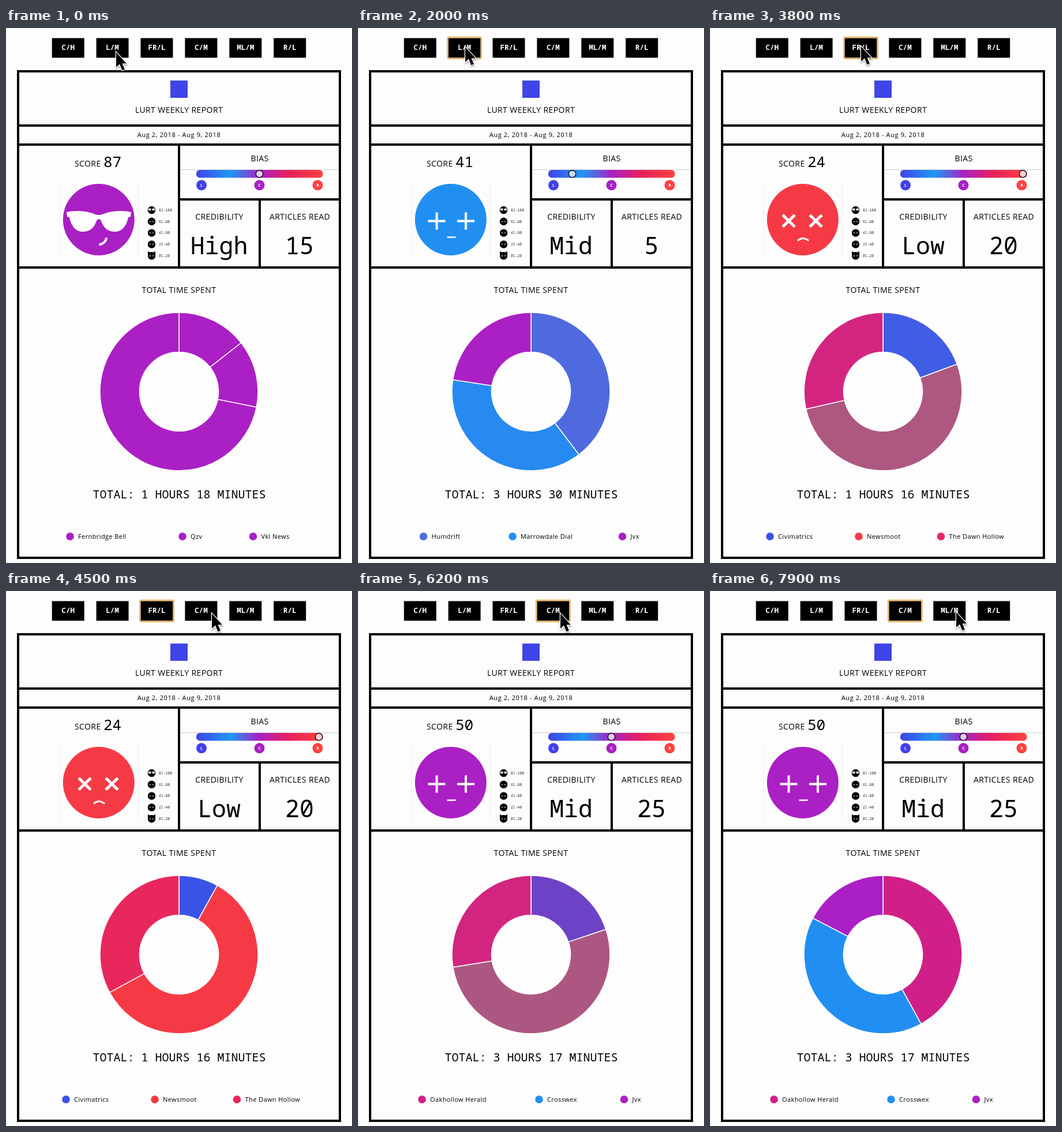
Animation of 600 by 927 pixels, one loop 8 s. Source, as an HTML page:

```html
<!DOCTYPE html>
<html lang="en">
<head>
<meta charset="utf-8">
<title>Weekly report</title>
<style>
html, body { margin: 0; width: 100%; height: 100%; overflow: hidden; background: #fefdfe; }
svg { display: block; width: 600px; height: 927px; }
text { font: 14px "Open Sans", "Noto Sans", sans-serif; letter-spacing: .4px; }
.mid { text-anchor: middle; }
.small { font-size: 11px; letter-spacing: .65px; }
.key { font-size: 11px; letter-spacing: .4px; }
.mono { font-family: "Noto Sans Mono", "DejaVu Sans Mono", monospace; letter-spacing: 0; }
.button { font-size: 12.6px; font-weight: 700; fill: #fff; }
.range { font-size: 6.4px; fill: #333; }
.side { font-size: 7px; font-weight: 700; fill: #fff; letter-spacing: 0; }
</style>
</head>
<body>
<svg viewBox="0 0 600 927">
  <defs>
    <linearGradient id="bias">
      <stop offset="0" stop-color="#3f42e8"/>
      <stop offset=".27" stop-color="#1f98f4"/>
      <stop offset=".5" stop-color="#a820c4"/>
      <stop offset=".73" stop-color="#e8215c"/>
      <stop offset="1" stop-color="#ff4240"/>
    </linearGradient>
    <filter id="shadow" x="-50%" y="-50%" width="200%" height="200%">
      <feDropShadow dx="0" dy="2" stdDeviation="1.5" flood-opacity=".4"/>
    </filter>
  </defs>
  <g id="buttons"></g>
  <rect id="ring" y="16" width="58.5" height="37" rx="2" fill="none" stroke="#ecb868" stroke-width="2.6"/>
  <path d="M92.5 264V402M229.5 264V402" stroke="#eee"/>
  <path d="M302 245.5H577" stroke="#ccc"/>
  <path d="M21 75H579V918H21ZM21 169H579M21 202H579M21 415H579M300 202V415M300 297H579M440 297V415"
    fill="none" stroke="#000" stroke-width="4"/>
  <rect x="285" y="91" width="30" height="30" fill="#3f46e8"/>
  <g class="mid">
    <text x="300" y="147">LURT WEEKLY REPORT</text>
    <text class="small" x="300" y="189">Aug 2, 2018 - Aug 9, 2018</text>
    <text x="440" y="231">BIAS</text>
    <text x="370" y="332">CREDIBILITY</text>
    <text x="509.5" y="332">ARTICLES READ</text>
    <text x="300" y="459">TOTAL TIME SPENT</text>
  </g>
  <text x="119" y="240">SCORE</text>
  <rect x="330" y="246" width="219.500" height="13.500" rx="6" fill="url(#bias)"/>
  <g id="marks"></g>
  <g id="report"></g>
  <g id="donut" stroke="#fff" stroke-width="1.5"></g>
  <path id="cursor" d="M0 0V26L6 20.500L10.500 31.500L15 29.500L10.500 19.500H18Z"
    stroke="#fff" stroke-width="2.4" paint-order="stroke" filter="url(#shadow)"/>
</svg>
<script>
const LOOP = 8000, GROW = 1000;
const PURPLE = [170, 32, 196], BLUE = [33, 143, 242], RED = [246, 58, 69];
const $ = id => document.getElementById(id);
const rgb = c => `rgb(${c.map(Math.round)})`;
const mix = (a, b, k) => a + (b - a) * k;

// cuts: the two inner slice borders in degrees; keys: [text x, label]
const states = [
  { at: 0, score: 87, cred: 'High', read: 15, time: '1 HOURS 18', thumb: 439.5, face: 'cool', tint: PURPLE,
    cuts: [51.9, 101.4], colors: [PURPLE, PURPLE, PURPLE],
    keys: [[125, 'Fernbridge Bell'], [320, 'Qzv'], [442.5, 'Vkl News']] },
  { at: 1467, score: 41, cred: 'Mid', read: 5, time: '3 HOURS 30', thumb: 371.5, face: 'flat', tint: BLUE,
    cuts: [147.2, 287.4], colors: [[74, 110, 223], BLUE, PURPLE],
    keys: [[127.5, 'Humdrift'], [282, 'Marrowdale Dial'], [472.5, 'Jvx']] },
  { at: 3567, score: 24, cred: 'Low', read: 20, time: '1 HOURS 16', thumb: 542.5, face: 'sad', tint: RED,
    cuts: [29, 241.4], colors: [[58, 84, 232], RED, [232, 40, 92]],
    keys: [[118, 'Civimatrics'], [272, 'Newsmoot'], [414.5, 'The Dawn Hollow']] },
  { at: 6100, score: 50, cred: 'Mid', read: 25, time: '3 HOURS 17', thumb: 439.5, face: 'flat', tint: PURPLE,
    cuts: [151.2, 297.5], colors: [[208, 32, 136], BLUE, PURPLE],
    keys: [[125, 'Oakhollow Herald'], [328, 'Crosswex'], [475.5, 'Jvx']] }
];

const faces = {
  cool: `<path fill="#fff" d="M105 319C120 315 143 317 155 323Q161 325 167 323C179 317 202 315 217 319L216 327L212 328
    C209 343 201 353 189 353C174 353 168 343 165 334Q161 328 157 334C154 343 148 353 133 353C121 353 113 343 110 328L106 327Z"/>
    <path d="M161.500 375.500Q172 374 174.500 363.500" stroke-width="4"/>`,
  flat: '<path d="M121.500 334.500H151.500M136.500 319.500V349.500M172 334.500H202M187 319.500V349.500" stroke-width="4"/><path d="M154.500 362.500H169.500" stroke-width="2.5"/>',
  sad: '<path d="M126 324L147 344.500M147 324L126 344.500M173 324L194 344.500M194 324L173 344.500" stroke-width="5"/><path d="M152 368.500Q161 360.500 171 368.500" stroke-width="3"/>'
};

// [time, tip x, tip y]
const moves = [
  [0, 191, 42], [500, 112, 36], [850, 112, 36], [1300, 186, 33], [2100, 186, 33], [2700, 262, 32],
  [4000, 262, 32], [4450, 357, 39], [4900, 357, 39], [5400, 351, 39], [7200, 351, 39], [7800, 427, 37], [8000, 427, 37]
];
// [time, focused button]
const focus = [[0, -1], [700, 0], [1400, 1], [3500, 2], [6000, 3]];
const buttonX = i => 79.7 + 76.9 * i;

$('buttons').innerHTML = ['C/H', 'L/M', 'FR/L', 'C/M', 'ML/M', 'R/L'].map((s, i) =>
  `<rect x="${buttonX(i)}" y="17.500" width="56" height="34"/>
   <text class="mono button mid" x="${buttonX(i) + 28}" y="37.500">${s}</text>`).join('');

const sides = [['L', 339, '#3f42e8'], ['C', 439.5, '#a820c4'], ['R', 540.5, '#ff4240']].map(([s, x, c]) =>
  `<circle cx="${x}" cy="272.300" r="9" fill="${c}"/><text class="side mid" x="${x}" y="275">${s}</text>`);
const ranges = ['81-100', '61-80', '41-60', '21-40', '01-20'].map((s, i) => {
  const y = 315.5 + 19.8 * i;
  const eyes = i ? `M249 ${y}h2M254 ${y}h2` : `M247 ${y - 1}h4.500M253.500 ${y - 1}h4.500`;
  const horns = i == 4 ? `<path d="M246 ${y}v-8l5 3h3l5-3v8z"/>` : '';
  return `<circle cx="252.500" cy="${y}" r="6.700"/>${horns}
    <path d="${eyes}" stroke="#fff" stroke-width="${i ? 1.3 : 3.5}"/>
    <text class="mono range" x="265" y="${y + 2.3}">${s}</text>`;
});
$('marks').innerHTML = [...sides, ...ranges].join('');

function showReport(s) {
  $('report').innerHTML = `
    <text class="mono" x="169" y="240.500" style="font-size:26px">${s.score}</text>
    <circle cx="160.800" cy="332" r="62" fill="${rgb(s.tint)}"/>
    <g fill="none" stroke="#fff">${faces[s.face].replace('fill="#fff"', 'fill="#fff" stroke="none"')}</g>
    <circle cx="${s.thumb}" cy="252.700" r="6.200" fill="#fff" fill-opacity=".75" stroke="#111" stroke-width="1.400"/>
    <g class="mid">
      <text class="mono" x="369.500" y="392" style="font-size:41.500px">${s.cred}</text>
      <text class="mono" x="509" y="392" style="font-size:41.500px">${s.read}</text>
      <text class="mono" x="300.500" y="814.500" style="font-size:20px">TOTAL: ${s.time} MINUTES</text>
    </g>` + s.keys.map(([x, label], i) =>
      `<circle cx="${x - 14}" cy="881" r="6.800" fill="${rgb(s.colors[i])}"/>
       <text class="key" x="${x}" y="884.500">${label}</text>`).join('');
}

function slice(from, to, color) {
  const point = (r, deg) => {
    const a = deg * Math.PI / 180;
    return `${300 + r * Math.sin(a)} ${630 - r * Math.cos(a)}`;
  };
  const big = +(to - from > 180);
  return `<path fill="${rgb(color)}" d="M${point(137, from)}A137 137 0 ${big} 1 ${point(137, to)}
    L${point(68.5, to)}A68.500 68.500 0 ${big} 0 ${point(68.5, from)}Z"/>`;
}

function showDonut(a, b, k) {
  const cuts = [0, ...b.cuts.map((v, i) => mix(a.cuts[i], v, k)), 360];
  $('donut').innerHTML = b.colors.map((c, i) =>
    slice(cuts[i], cuts[i + 1], c.map((v, j) => mix(a.colors[i][j], v, k)))).join('');
}

function cursorAt(t) {
  const i = moves.findIndex(m => m[0] > t);
  const [t0, x0, y0] = moves[i - 1], [t1, x1, y1] = moves[i];
  const u = (t - t0) / (t1 - t0), k = u * u * (3 - 2 * u);
  return [mix(x0, x1, k), mix(y0, y1, k)];
}

let shown;
function frame() {
  const t = performance.now() % LOOP;
  const n = states.findLastIndex(s => s.at <= t), s = states[n];
  if (shown !== n) showReport(states[shown = n]);
  const u = Math.min(1, (t - s.at) / GROW);
  showDonut(states[Math.max(0, n - 1)], s, 1 - (1 - u) ** 4);
  const active = focus.findLast(f => f[0] <= t)[1];
  $('ring').setAttribute('x', buttonX(active) - 1.3);
  $('ring').style.display = active < 0 ? 'none' : '';
  $('cursor').setAttribute('transform', `translate(${cursorAt(t)})`);
  requestAnimationFrame(frame);
}
frame();
</script>
</body>
</html>
```
